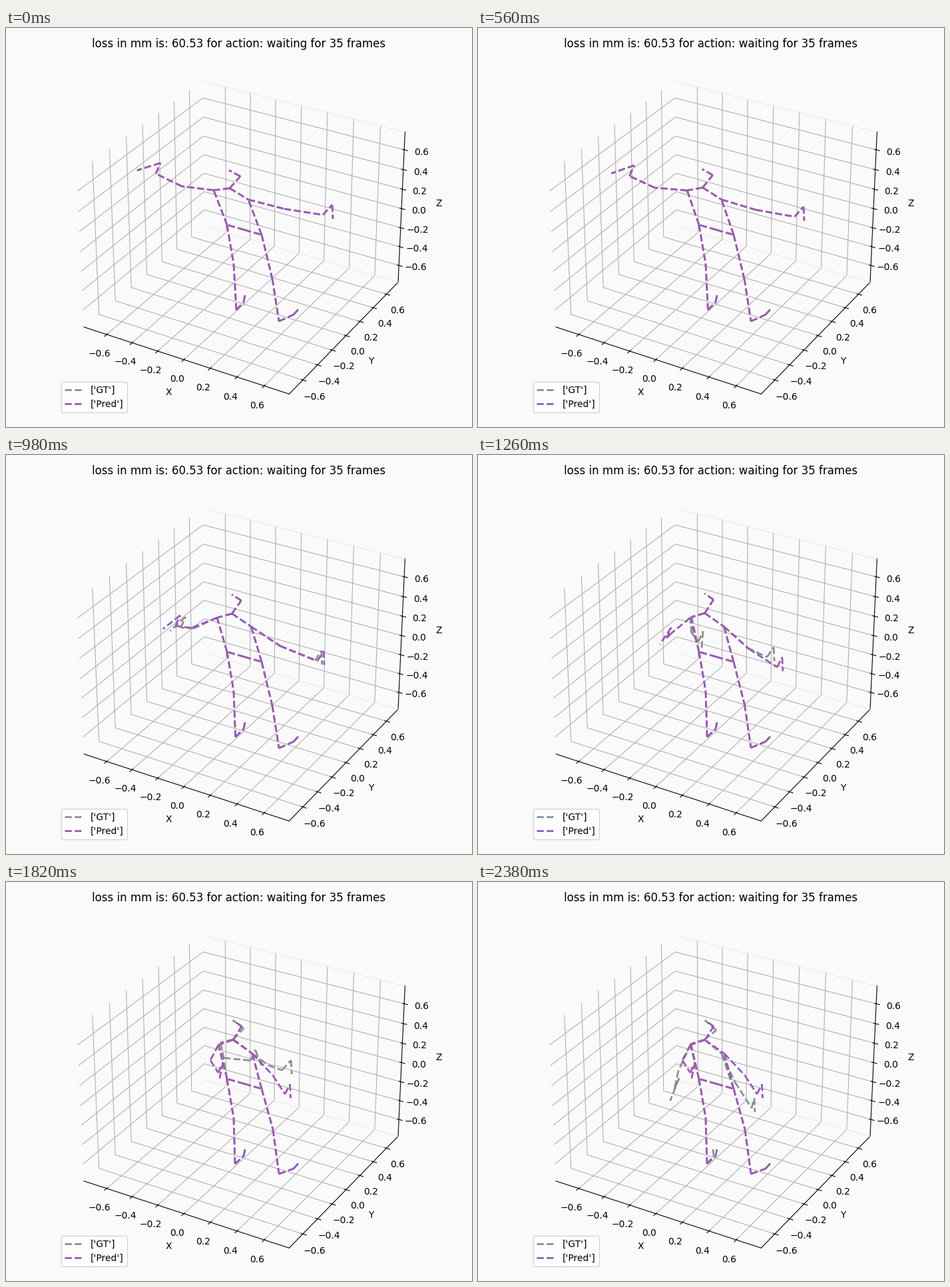
A matplotlib script for the animation above (2450 ms loop, 700 px wide and 600 px high).

```python
import numpy as np
import matplotlib.pyplot as plt
from matplotlib.animation import FuncAnimation
from matplotlib.lines import Line2D

W, H, DPI = 700, 600, 100
FRAMES, STEP_MS = 35, 70
PAPER, GREY, PURPLE = "#fafafa", "#8e8e8e", "#9b59b6"
LIMIT = 0.78125   # data range on every axis
SIDE = 548.67     # axes square, centred across the stage
BOTTOM = 15

# Starting pose in screen pixels; L and R are the sides of the picture.
START = dict(
    nose=(335, 214), head=(352, 223), neck=(336, 241),
    shoulderL=(312, 244), elbowL=(264, 238), wristL=(225, 219),
    shoulderR=(364, 258), elbowR=(418, 272), wristR=(476, 281),
    pelvis=(358, 303.5),
    hipL=(332, 296), kneeL=(342, 355), ankleL=(346, 424),
    footL=(357, 412), toeL=(359, 402),
    hipR=(384, 311), kneeR=(400, 377), ankleR=(410, 441),
    footR=(432, 431), toeR=(441, 421))

# Each move eases some joints to new places: first frame, last frame, joints.
# Both figures lean forward and lower the arms.
LOWER_ARMS = [
    (0, 22, dict(nose=(341, 208), head=(354, 217), neck=(341, 237.5),
                 shoulderL=(319, 245), shoulderR=(370, 258),
                 ankleL=(344, 424))),
    (6, 18, dict(elbowL=(281, 267), wristL=(260, 268),
                 elbowR=(411, 292), wristR=(469, 319))),
    (12, 26, dict(elbowL=(307, 268), wristL=(319, 287),
                  elbowR=(401, 291), wristR=(419, 319),
                  kneeR=(401, 372), ankleR=(410, 439))),
]
# One of them then folds the arms, opens them and lets them drop.
FOLD_ARMS = [
    (13, 18, dict(shoulderL=(321, 243), elbowL=(320, 266), wristL=(331, 281),
                  elbowR=(405, 290), wristR=(434, 304))),
    (18, 22, dict(head=(356, 217), neck=(343, 236), shoulderL=(324, 240),
                  elbowL=(335, 260), wristL=(385, 264),
                  elbowR=(386, 266), wristR=(401, 275))),
    (22, 30, dict(head=(358, 223), neck=(340, 237), shoulderL=(320, 243),
                  elbowL=(319, 269), wristL=(350, 273),
                  elbowR=(402, 285), wristR=(428, 291))),
    (30, 34, dict(shoulderR=(366, 258), elbowL=(301, 284), wristL=(295, 311),
                  elbowR=(386, 301), wristR=(411, 340),
                  footL=(354, 411), toeL=(353, 402))),
]

CHAINS = ["hipR kneeR ankleR footR toeR", "hipL kneeL ankleL footL toeL",
          "pelvis hipR", "pelvis hipL",
          "hipL shoulderL elbowL wristL thumbL handL",
          "hipR shoulderR elbowR wristR thumbR handR",
          "neck shoulderR", "neck shoulderL", "neck head nose"]
BONES = [pair for chain in CHAINS
         for pair in zip(chain.split(), chain.split()[1:])]


def ease(t, start, end):
    s = np.clip((t - start) / (end - start), 0, 1)
    return s * s * (3 - 2 * s)


def add_hands(joints):
    """Hang thumbs and hands on the wrists, turning as the arms come down."""
    raised_l, raised_r = START["wristL"], START["wristR"]
    left, right = joints["wristL"], joints["wristR"]
    dx, dy = left - raised_l
    joints["thumbL"] = left + (7, -16)
    joints["handL"] = joints["thumbL"] + (0.31 * dx - 35, 0.25 * dy + 11)
    drop = right[1] - raised_r[1]
    joints["thumbR"] = right + (14 - 0.17 * drop, -15)
    joints["handR"] = joints["thumbR"] + (1, 21)


def pose(t, moves):
    joints = {name: np.array(xy, float) for name, xy in START.items()}
    for start, end, targets in moves:
        s = ease(t, start, end)
        for name, xy in targets.items():
            joints[name] += (xy - joints[name]) * s
    add_hands(joints)
    return joints


fig = plt.figure(figsize=(W / DPI, H / DPI), dpi=DPI, facecolor=PAPER)

ax = fig.add_axes([(W - SIDE) / 2 / W, BOTTOM / H, SIDE / W, SIDE / H],
                  projection="3d", facecolor=PAPER)
ax.set(xlim=(-LIMIT, LIMIT), ylim=(-LIMIT, LIMIT), zlim=(-LIMIT, LIMIT),
       xlabel="X", ylabel="Y", zlabel="Z")
for axis in (ax.xaxis, ax.yaxis, ax.zaxis):
    axis.set_pane_color((1, 1, 1, 0))
    axis.set_ticks(np.arange(-3, 4) / 5)
ax.legend(handles=[Line2D([], [], ls="--", lw=2, color=c, label=name)
                   for c, name in ((GREY, "['GT']"), (PURPLE, "['Pred']"))],
          loc="lower left")
fig.text(0.5, 1 - 28.67 / H, "loss in mm is: 60.53 for action: waiting for 35 frames",
         ha="center", va="baseline", fontsize=12)

# Pixel-space layer for the figures and the faint rim of the back wall
layer = fig.add_axes([0, 0, 1, 1])
layer.set(xlim=(0, W), ylim=(H, 0))
layer.axis("off")
for xs, ys in (((296.5, 599), (80.5, 156.5)), ((298.5, 589), (298, 382.5))):
    layer.plot(xs, ys, color="#e9e9e9", lw=0.7)

figures = [(moves, [layer.plot([], [], "--", lw=2, color=color)[0]
                    for _ in BONES])
           for moves, color in ((LOWER_ARMS + FOLD_ARMS, GREY),
                                (LOWER_ARMS, PURPLE))]


def draw(frame):
    for moves, lines in figures:
        joints = pose(frame, moves)
        for line, (a, b) in zip(lines, BONES):
            line.set_data(*zip(joints[a], joints[b]))
    return [line for _, lines in figures for line in lines]


anim = FuncAnimation(fig, draw, frames=FRAMES, init_func=lambda: draw(0),
                     interval=STEP_MS, repeat=True, repeat_delay=0)
plt.show()
```
